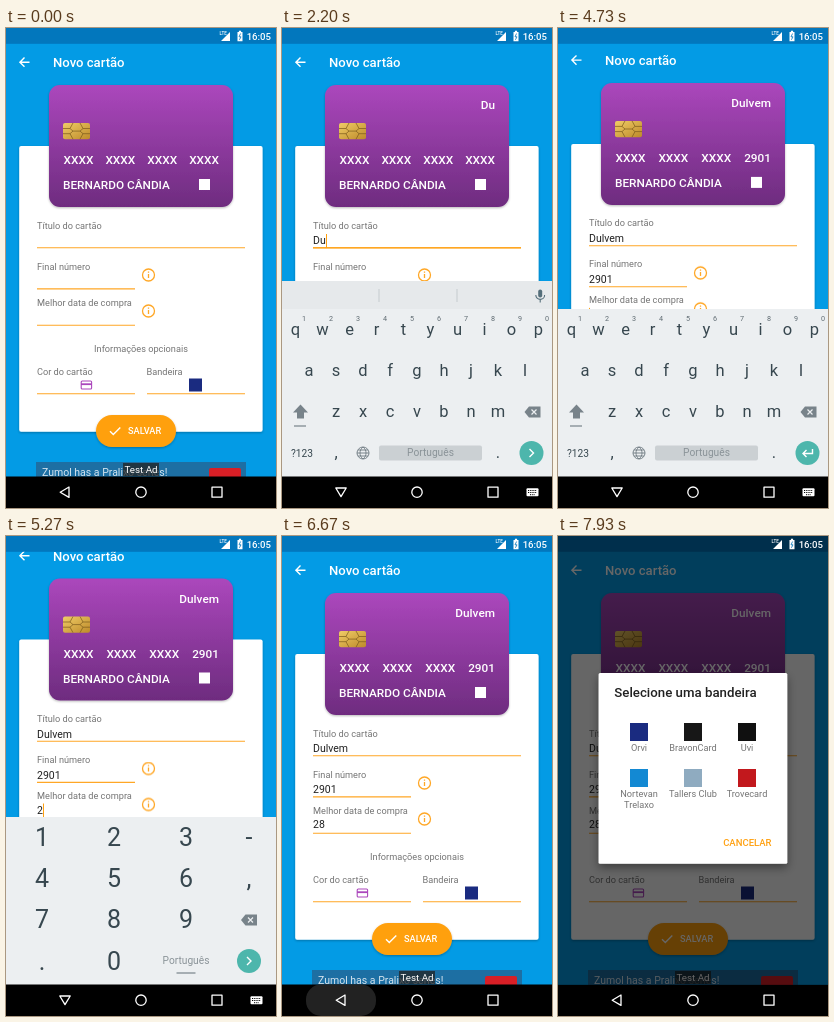
An HTML page that plays this animation: 270x480 px, repeating every 8 s.

```html
<!DOCTYPE html>
<html lang="pt-BR">
<head>
<meta charset="utf-8">
<title>Novo cartão</title>
<style>
html, body { margin: 0; width: 100%; height: 100%; overflow: hidden; background: #039be5; }
#stage { position: relative; width: 270px; height: 480px; overflow: hidden; font: 9.2px Roboto, sans-serif; }
#stage > *, #page > svg { position: absolute; left: 0; top: 0; width: 270px; height: 480px; }
svg text { font-family: Roboto, sans-serif; }
.bold { font-weight: 500; }
.mid { text-anchor: middle; }
.label { fill: #757575; }

/* page content */
#page { animation: scroll 8s linear infinite; }
.typed { position: absolute; left: 31px; height: 14px; line-height: 14px; font-size: 10.5px; color: #212121; white-space: nowrap; display: flex; }
.caret { width: 1.3px; height: 14px; background: #ffa010; }
.holder { position: absolute; color: #fff; font-size: 11.8px; font-weight: 500; line-height: 14px; white-space: nowrap; }
#digits { left: 57.5px; width: 155.5px; top: 125px; display: flex; justify-content: space-between; }
#bank { right: 57px; top: 70px; }
.mask { animation: mask 8s step-end infinite; }
@keyframes mask { 0% { font-size: inherit; } 44.125%, to { font-size: 0; } }
@keyframes scroll {
  0%, 58.6% { transform: none; }
  59.125% { transform: translateY(-2px); }
  60.3% { transform: translateY(-11px); }
  61.2%, 80.2% { transform: translateY(-14.5px); }
  82.5%, to { transform: none; }
}

/* focus */
#caret1, #line1 { animation: focus1 8s step-end infinite; }
#caret2, #line2 { animation: focus2 8s step-end infinite; }
#caret3, #line3 { animation: focus3 8s step-end infinite; }
@keyframes focus1 { 0% { opacity: 0; } 12.5% { opacity: 1; } 37.5%, to { opacity: 0; } }
@keyframes focus2 { 0% { opacity: 0; } 37.5% { opacity: 1; } 57.5%, to { opacity: 0; } }
@keyframes focus3 { 0% { opacity: 0; } 57.5% { opacity: 1; } 80.2%, to { opacity: 0; } }

/* keyboard */
#ime { animation: ime 8s linear infinite; }
@keyframes ime {
  0%, 13.4% { opacity: 0; transform: translateY(30px); }
  15% { opacity: .8; transform: translateY(12px); }
  16.6%, 80.2% { opacity: 1; transform: none; }
  82.5%, to { opacity: 0; transform: translateY(26px); }
}
.words { animation: words 8s step-end infinite; }
.enter { animation: enter 8s step-end infinite; }
.letters { animation: letters 8s step-end infinite; }
.numbers { animation: numbers 8s step-end infinite; }
@keyframes words { 0% { opacity: 1; } 37.5%, to { opacity: 0; } }
@keyframes enter { 0% { opacity: 0; } 37.5%, to { opacity: 1; } }
@keyframes letters { 0% { opacity: 1; } 41.6% { opacity: 0; } 57.5% { opacity: 1; } 60.8%, to { opacity: 0; } }
@keyframes numbers { 0% { opacity: 0; } 41.6% { opacity: 1; } 57.5% { opacity: 0; } 60.8%, to { opacity: 1; } }

/* navigation bar and dialog */
.idle { animation: idle 8s step-end infinite; }
.open { animation: open 8s step-end infinite; }
#ripple { animation: ripple 8s linear infinite; }
#dialog { animation: dialog 8s ease-out infinite; }
@keyframes idle { 0% { opacity: 1; } 13.4% { opacity: 0; } 80.8%, to { opacity: 1; } }
@keyframes open { 0% { opacity: 0; } 13.4% { opacity: 1; } 80.8%, to { opacity: 0; } }
@keyframes ripple { 0%, 79.4% { opacity: 0; } 81.5%, 83.5% { opacity: 1; } 87%, to { opacity: 0; } }
@keyframes dialog { 0%, 93.4% { opacity: 0; } 96.2%, to { opacity: 1; } }
</style>
</head>
<body>
<div id="stage">
  <div id="page">
    <svg viewBox="0 0 270 480">
      <defs>
        <linearGradient id="purple" x2="0" y2="1"><stop stop-color="#ab47bc"/><stop offset="1" stop-color="#6e2c7f"/></linearGradient>
        <linearGradient id="gold" x2="1" y2="1"><stop stop-color="#f0cc66"/><stop offset="1" stop-color="#bd8a2a"/></linearGradient>
        <filter id="shade" x="-20%" y="-20%" width="140%" height="150%"><feDropShadow dx="0" dy="1" stdDeviation="1" flood-opacity=".28"/></filter>
        <filter id="lift" x="-20%" y="-20%" width="140%" height="150%"><feDropShadow dx="0" dy="4" stdDeviation="5" flood-opacity=".4"/></filter>
      </defs>
      <path d="M23.5 34.2H14M18.5 29.6 13.9 34.2 18.5 38.8" fill="none" stroke="#fff" stroke-width="1.4"/>
      <text class="bold" x="47" y="39" font-size="13.1" fill="#fff">Novo cartão</text>
      <rect x="13.2" y="118" width="243.4" height="285.7" rx="2" fill="#fff" filter="url(#shade)"/>
      <rect x="43" y="57" width="184" height="122" rx="11" fill="url(#purple)" filter="url(#shade)"/>
      <rect x="57" y="95" width="27" height="16.3" rx="2" fill="url(#gold)"/>
      <path d="M57 100.5h7l3 2.6-3 2.6h-7M84 100.5h-7l-3 2.6 3 2.6h7M67 103.1h7M64 100.5l3-5.5M77 100.5l-3-5.5M64 105.7l3 5.5M77 105.7l-3 5.5" fill="none" stroke="#7a5a1c" stroke-width=".7"/>
      <rect x="193" y="151" width="11" height="11" fill="#fff"/>
      <g class="label" font-size="9.2">
        <text x="31" y="200.5">Título do cartão</text>
        <text x="31" y="241.5">Final número</text>
        <text x="31" y="277.5">Melhor data de compra</text>
        <text x="135" y="323.5" class="mid">Informações opcionais</text>
        <text x="31" y="346.5">Cor do cartão</text>
        <text x="140.5" y="346.5">Bandeira</text>
      </g>
      <path d="M31 219.8H239M31 260.9H129M31 297.3H129M31 365.8H129M141 365.8H239" stroke="#ffa726" stroke-width="1.1"/>
      <g stroke="#ffa010" stroke-width="1.4">
        <path id="line1" d="M31 219.9H239"/><path id="line2" d="M31 261H129"/><path id="line3" d="M31 297.4H129"/>
      </g>
      <g fill="none" stroke="#ffa726" stroke-width="1.3">
        <circle cx="142.5" cy="247" r="6"/><path d="M142.5 246v4M142.5 243.4v1.3"/>
        <circle cx="142.5" cy="283" r="6"/><path d="M142.5 282v4M142.5 279.4v1.3"/>
      </g>
      <rect x="75.2" y="353" width="10.4" height="8" rx="1" fill="none" stroke="#ab47bc" stroke-width="1.1"/>
      <path d="M75 356.2h11" stroke="#ab47bc" stroke-width="1.8"/>
      <rect x="183" y="350.5" width="13" height="13" fill="#1a2b80"/>
      <rect x="90" y="387" width="80" height="32" rx="16" fill="#ffa010" filter="url(#shade)"/>
      <path d="M104 403.3l3.3 3.3 7-7" fill="none" stroke="#fff" stroke-width="1.4"/>
      <text class="bold" x="122" y="406.4" font-size="9.2" fill="#fff">SALVAR</text>
      <rect x="30" y="434" width="210" height="33" fill="#1d6fa3"/>
      <text x="36" y="447.6" font-size="10.5" fill="#d3e3ee">Zumol has a Pralixo series!</text>
      <rect x="203" y="440" width="32" height="32" rx="2" fill="#d81f26"/>
      <rect x="117" y="435" width="36" height="13" fill="#222" fill-opacity=".75"/>
      <text x="135" y="445" class="mid" font-size="9.8" fill="#fff">Test Ad</text>
    </svg>
    <div class="holder" id="bank"></div>
    <div class="holder" id="digits"><span>XXXX</span><span>XXXX</span><span>XXXX</span><span id="last"><span class="mask">XXXX</span></span></div>
    <div class="holder" style="left:57px;top:150px">BERNARDO CÂNDIA</div>
    <div class="typed" style="top:205.6px"><span id="name"></span><i class="caret" id="caret1"></i></div>
    <div class="typed" style="top:246.6px"><span id="number"></span><i class="caret" id="caret2"></i></div>
    <div class="typed" style="top:282.4px"><span id="day"></span><i class="caret" id="caret3"></i></div>
  </div>

  <svg viewBox="0 0 270 480">
    <rect width="270" height="15.8" fill="#0277bd"/>
    <rect y="448.5" width="270" height="32"/>
  </svg>

  <svg id="ime" viewBox="0 0 270 480">
    <g class="words">
      <rect y="253" width="270" height="28.5" fill="#e6e9eb"/>
      <path d="M97 261v13M175 261v13" stroke="#c5cbce"/>
      <rect x="256.2" y="261.5" width="4" height="8" rx="2" fill="#546e7a"/>
      <path d="M253.8 267a4.4 4.4 0 0 0 8.8 0M258.2 271.4v3" fill="none" stroke="#546e7a" stroke-width="1.1"/>
    </g>
    <rect y="281" width="270" height="168" fill="#eceff1"/>
    <rect y="448.5" width="270" height="32"/>
    <g class="letters" id="letters"></g>
    <g class="numbers" id="numbers"></g>
  </svg>

  <svg id="dialog" viewBox="0 0 270 480">
    <rect width="270" height="448.5" fill-opacity=".6"/>
    <rect x="40.6" y="137" width="188.7" height="190.7" rx="1.5" fill="#fff" filter="url(#lift)"/>
    <text class="bold" x="56.3" y="160.5" font-size="13.25" fill="#212121">Selecione uma bandeira</text>
    <g id="brands" class="mid label" font-size="9.2"></g>
    <text class="bold" x="213.5" y="310.3" font-size="9.5" text-anchor="end" fill="#ffa010">CANCELAR</text>
  </svg>

  <svg viewBox="0 0 270 480">
    <text x="213.5" y="7" font-size="4.6" class="bold" fill="#fff">LTE</text>
    <path d="M224 4v9h-9zM231.5 4h1.4V2.8h2.2V4h1.4v9.2h-5z" fill="#fff"/>
    <path d="M234.6 5.5l-1.6 3.3h2l-1.6 3" fill="none" stroke="#0277bd" stroke-width=".8"/>
    <text x="265" y="11.6" font-size="9.6" class="bold" text-anchor="end" fill="#fff">16:05</text>
    <rect id="ripple" x="24" y="448.5" width="70" height="31.5" rx="15" fill="#222"/>
    <g fill="none" stroke="#fff" stroke-width="1.3" stroke-linejoin="round">
      <path class="idle" d="M63 459v10.4l-8.8-5.2z"/>
      <path class="open" d="M53.8 460h10.4L59 468.6z"/>
      <circle cx="135" cy="464.2" r="5.2"/>
      <rect x="206" y="459.2" width="10" height="10"/>
    </g>
    <g class="open">
      <rect x="244.5" y="460.3" width="12" height="8" rx="1" fill="#fff"/>
      <path d="M246 462.5h9M246 464.5h9M248 466.7h5" stroke="#000" stroke-dasharray="1 .8"/>
    </g>
  </svg>
</div>

<script>
const $ = id => document.getElementById(id);
const label = (x, y, s, size, fill = '#37474f') =>
  `<text class="mid" x="${x}" y="${y}" font-size="${size}" fill="${fill}">${s}</text>`;
const stroke = (d, color, width, cls = '') =>
  `<path class="${cls}" d="${d}" fill="none" stroke="${color}" stroke-width="${width}"/>`;
const action = x => `<circle cx="${x}" cy="425" r="12" fill="#4db6ac"/>`;
const next = (x, cls) => stroke(`M${x - 2} 421l4 4-4 4`, '#fff', 1.4, cls);
const erase = x => `<path d="M${x - 8} 384l4.5-5.5h11.5v11h-11.5z" fill="#78838a"/>` +
  stroke(`M${x - 1} 381.5l5 5M${x + 4} 381.5l-5 5`, '#eceff1', 1.2);

// letter keyboard
const rows = [['qwertyuiop', 13.5], ['asdfghjkl', 27], ['zxcvbnm', 54]];
let keys = '';
rows.forEach(([chars, x], r) => [...chars].forEach((c, i) => {
  keys += label(x + 27 * i, 307.3 + 41 * r, c, 16.5);
  if (!r) keys += label(x + 8.5 + 27 * i, 292.5, (i + 1) % 10, 7.2, '#5f6b72');
}));
$('letters').innerHTML = keys +
  '<path d="M18.5 376.5l7.5 8h-4v6h-7v-6h-4z" fill="#78838a"/>' +
  stroke('M12 398h12', '#78838a', 1.2) + erase(250.5) +
  label(20, 428.5, '?123', 10.2) + label(54, 430, ',', 16.5) + label(216, 430, '.', 16.5) +
  stroke('M75 425a6 6 0 1 0 12 0a6 6 0 1 0-12 0h12M81 419c-4 3-4 9 0 12c4-3 4-9 0-12M76 422h10M76 428h10', '#78838a', 1) +
  '<rect x="97" y="417.5" width="103" height="15" rx="2" fill="#cbd0d3"/>' +
  label(148.5, 428.4, 'Português', 10.2, '#8a9398') +
  action(249.5) + next(249.5, 'words') +
  stroke('M254.5 421v4.5h-9M248.5 422l-3.5 3.5 3.5 3.5', '#fff', 1.4, 'enter');

// number keyboard
const pad = ['123-', '456,', '789', '.0'];
$('numbers').innerHTML = pad.map((row, r) => [...row].map((c, i) =>
  label([36, 108, 180, 243][i], 310 + 41.2 * r, c, 25)).join('')).join('') +
  erase(243) + label(180, 428.4, 'Português', 10.2, '#8a9398') +
  stroke('M170.5 437h19', '#78838a', 1.2) + action(243) + next(243, '');

// dialog choices
const brands = [
  ['#1a2b80', 'Orvi'], ['#171717', 'BravonCard'], ['#101010', 'Uvi'],
  ['#1389d3', 'Nortevan', 'Trelaxo'], ['#8fabc0', 'Tallers Club'], ['#c2181d', 'Trovecard']
];
$('brands').innerHTML = brands.map(([color, ...lines], i) => {
  const x = 81 + 54 * (i % 3), y = i < 3 ? 187 : 233;
  return `<rect x="${x - 9}" y="${y}" width="18" height="18" fill="${color}"/>` +
    lines.map((s, n) => `<text x="${x}" y="${y + 28.2 + 10.8 * n}">${s}</text>`).join('');
}).join('');

// typed characters appear at given times (ms) in each listed element
const sheet = document.head.appendChild(document.createElement('style'));
function type(text, times, ...ids) {
  [...text].forEach((c, i) => {
    const t = times[i];
    sheet.append(`@keyframes key${t}{0%{font-size:0}${t / 80}%,to{font-size:inherit}}`);
    for (const id of ids) {
      const span = $(id).appendChild(document.createElement('span'));
      span.textContent = c;
      span.style.animation = `key${t} 8s step-end infinite`;
    }
  });
}
type('Dulvem', [1700, 2090, 2260, 2420, 2600, 2780], 'name', 'bank');
type('2901', [3530, 3790, 4050, 4310], 'number', 'last');
type('28', [5270, 5700], 'day');
</script>
</body>
</html>
```
